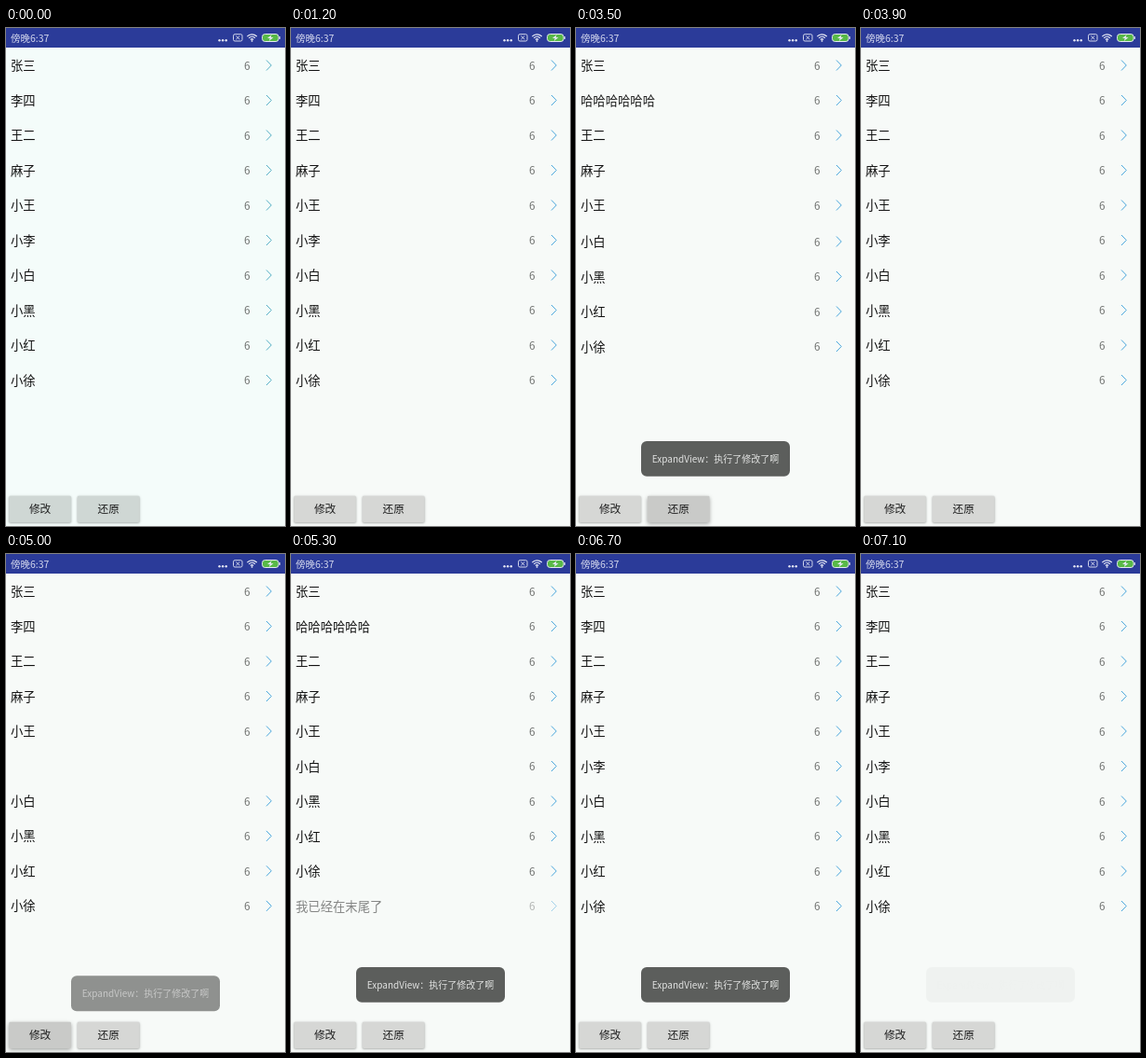
Animation of 300x534 px, one loop 7.4 s. Source, as an HTML page with a canvas:

```html
<!DOCTYPE html>
<html lang="zh-CN">
<head>
<meta charset="utf-8">
<title>列表更新</title>
<style>
html, body { margin: 0; width: 100%; height: 100%; overflow: hidden; background: #f7faf8; }
canvas { display: block; width: 300px; height: 534px; }
</style>
</head>
<body>
<canvas id="stage"></canvas>
<script>
const W = 300, H = 534, LOOP = 7400, STEP = 100, ROW = 37.5;
const FONT = '"Noto Sans CJK SC", "Noto Sans CJK JP", "Noto Sans", sans-serif';
const TOP = ['张三', '李四', '王二', '麻子', '小王'];
const TAIL = ['小白', '小黑', '小红', '小徐'];
const RENAMED = '哈哈哈哈哈哈', EXTRA = '我已经在末尾了', DROPPED = '小李';

// List updates: start time and whether the edited list is the result
const UPDATES = [[1648, true], [3348, false], [4870, true], [6170, false]];
const PRESSES = { edit: [1500, 4800], reset: [3300, 6100] };
const TOASTS = [[1660, 3620], [4880, 6850]];

const canvas = document.getElementById('stage');
const ctx = canvas.getContext('2d');
const dpr = window.devicePixelRatio || 1;
canvas.width = W * dpr;
canvas.height = H * dpr;

const clamp = x => Math.max(0, Math.min(1, x));
const ease = x => 0.5 - Math.cos(clamp(x) * Math.PI) / 2;
const mix = (a, b, k) => `rgb(${a.map((v, i) => Math.round(v + (b[i] - v) * k))})`;

function text(str, x, y, size, color, align = 'left') {
  ctx.font = `${size}px ${FONT}`;
  ctx.fillStyle = color;
  ctx.textAlign = align;
  ctx.fillText(str, x, y + size * 0.38);
}

function box(x, y, w, h, r) {
  ctx.beginPath();
  ctx.roundRect(x, y, w, h, r);
}

function line(points, color, width) {
  ctx.beginPath();
  points.forEach(([x, y]) => ctx.lineTo(x, y));
  ctx.strokeStyle = color;
  ctx.lineWidth = width;
  ctx.stroke();
}

function statusBar(t) {
  const white = '#e4e7f4';
  ctx.fillStyle = '#2b3b99';
  ctx.fillRect(0, 0, W, 21);
  text('傍晚6:37', 5, 11, 10.5, '#d5d9ee');

  ctx.fillStyle = white;
  for (let i = 0; i < 3; i++) {
    ctx.beginPath();
    ctx.arc(229.5 + i * 3.6, 13.3, 1.2, 0, 7);
    ctx.fill();
  }

  box(244.5, 6.7, 9.5, 7.3, 1.6);
  ctx.strokeStyle = white;
  ctx.lineWidth = 0.9;
  ctx.stroke();
  line([[247.4, 8.6], [251.2, 12.2]], white, 0.9);
  line([[251.2, 8.6], [247.4, 12.2]], white, 0.9);

  ctx.strokeStyle = white;
  ctx.lineWidth = 1.3;
  for (const r of [2.1, 4.6, 7.1]) {
    ctx.beginPath();
    ctx.arc(264.5, 14, r, -Math.PI * 0.76, -Math.PI * 0.24);
    ctx.stroke();
  }
  ctx.fillStyle = white;
  ctx.beginPath();
  ctx.arc(264.5, 13.9, 0.9, 0, 7);
  ctx.fill();
  if (t >= 1800 && t < 2600) {
    ctx.beginPath();
    ctx.moveTo(266.6, 12.2);
    ctx.lineTo(270, 12.2);
    ctx.lineTo(268.3, 14.8);
    ctx.fill();
  }

  box(275.5, 6.5, 17.6, 8, 3);
  ctx.fillStyle = '#58b947';
  ctx.fill();
  ctx.strokeStyle = white;
  ctx.lineWidth = 1;
  ctx.stroke();
  ctx.fillStyle = white;
  ctx.fillRect(293.6, 9, 1.2, 3);
  ctx.beginPath();
  [[285.6, 7.2], [281, 11], [283.8, 11], [282.8, 14], [287.6, 10.1], [284.8, 10.1]]
    .forEach(([x, y]) => ctx.lineTo(x, y));
  ctx.fill();
}

function row(name, slot, alpha, arrow) {
  if (alpha <= 0) return;
  const y = 40 + slot * ROW;
  ctx.globalAlpha = alpha;
  text(name, 5, y, 13.33, '#121212');
  text('6', 256, y + 0.3, 11.7, '#707270');
  line([[280, y - 5.5], [285.3, y], [280, y + 5.5]], arrow, 1);
  ctx.globalAlpha = 1;
}

// Removal fades first, then rows move and cross-fade, then the new row fades in
function listState(t) {
  let s = { moved: 0, dropped: 1, extra: 0 };
  for (const [start, edited] of UPDATES) {
    const d = t - start;
    if (d < 0) break;
    const out = 1 - ease(d / 120), move = ease((d - 120) / 250), add = ease((d - 370) / 120);
    s = edited ? { moved: move, dropped: out, extra: add }
               : { moved: 1 - move, dropped: add, extra: out };
  }
  return s;
}

function list(t, arrow) {
  const { moved, dropped, extra } = listState(t);
  TOP.forEach((name, i) => row(name, i, i === 1 ? 1 - moved : 1, arrow));
  row(RENAMED, 1, moved, arrow);
  row(DROPPED, 5, dropped, arrow);
  TAIL.forEach((name, i) => row(name, 6 + i - moved, 1, arrow));
  row(EXTRA, 9, extra, arrow);
}

function pressure(t, starts) {
  return Math.max(...starts.map(s => {
    const d = t - s;
    return d < 0 ? 0 : clamp((d + 80) / 200) * clamp((480 - d) / 180);
  }));
}

function button(label, x, press, settled) {
  const base = [207, 215, 212].map((v, i) => v + ([214, 215, 213][i] - v) * settled);
  ctx.save();
  ctx.shadowColor = 'rgba(0,0,0,0.36)';
  ctx.shadowBlur = (2.4 + press * 2) * dpr;
  ctx.shadowOffsetY = (0.9 + press * 0.8) * dpr;
  ctx.fillStyle = mix(base, [201, 202, 200], press);
  box(x, 501.7, 66.6, 28.2, 1.3);
  ctx.fill();
  ctx.restore();
  text(label, x + 33.3, 516, 11.7, '#1f1f1f', 'center');
}

function toast(t) {
  for (const [start, end] of TOASTS) {
    const enter = clamp((t - start) / 180);
    const alpha = enter * clamp(1 - (t - end) / 262);
    if (alpha <= 0) continue;
    ctx.save();
    ctx.globalAlpha = alpha;
    ctx.translate(0, 28 * (1 - enter));
    box(70, 443, 160, 37.8, 6);
    ctx.fillStyle = '#5c5e5c';
    ctx.fill();
    text('ExpandView：执行了修改了啊', 150, 462, 10, '#e2e3e2', 'center');
    ctx.restore();
  }
}

function draw(t) {
  const settled = clamp(t / 800);
  ctx.setTransform(dpr, 0, 0, dpr, 0, 0);
  ctx.fillStyle = mix([244, 252, 250], [247, 250, 248], settled);
  ctx.fillRect(0, 0, W, H);
  list(t, mix([82, 174, 196], [72, 166, 220], settled));
  button('修改', 3.3, pressure(t, PRESSES.edit), settled);
  button('还原', 76.9, pressure(t, PRESSES.reset), settled);
  toast(t);
  statusBar(t);
}

const begin = performance.now();
function tick() {
  const t = (performance.now() - begin) % LOOP;
  draw(Math.min(Math.floor(t / STEP) * STEP, 7100));
  requestAnimationFrame(tick);
}
tick();
</script>
</body>
</html>
```
